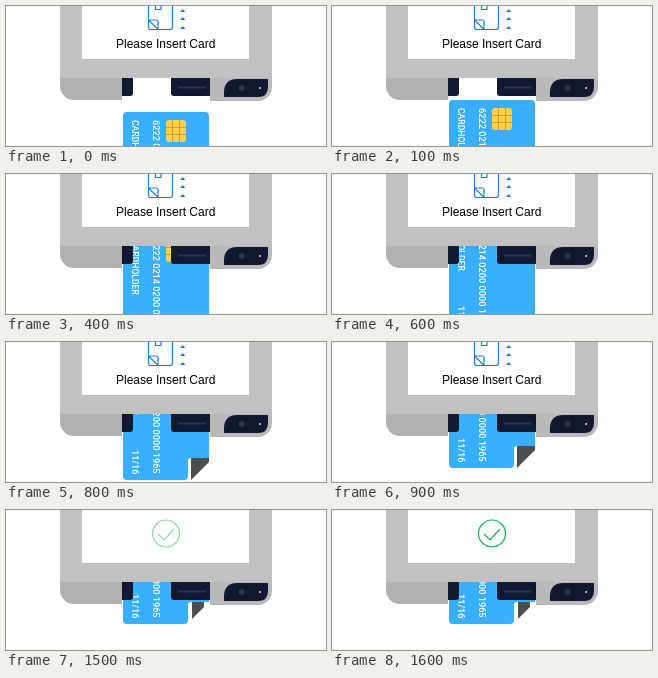
An HTML page for the animation above (2000 ms loop, 320 by 140 pixels).

```html
<!DOCTYPE html>
<html lang="en">
<head>
<meta charset="utf-8">
<title>Insert card</title>
<style>
html, body { margin: 0; width: 100%; height: 100%; overflow: hidden; background: #fff; }
svg { display: block; width: 320px; height: 140px; }
.prompt { font: 12px "Liberation Sans", Arial, sans-serif; }
.print { font: 500 9.2px Roboto, sans-serif; fill: #fff; }
.name { font-size: 8.6px; }

.card { animation: insert 2s infinite; }
.ask { animation: ask 2s step-end infinite; }
.done { opacity: 0; animation: done 2s step-end infinite; }
.wide { animation: wide 2s step-end infinite; }

@keyframes insert {
  0% { transform: translateY(0); animation-timing-function: steps(10, end); }
  50%, 100% { transform: translateY(-120px); }
}
@keyframes ask { 0% { opacity: 1; } 75%, 100% { opacity: 0; } }
@keyframes done { 0% { opacity: 0; } 75% { opacity: .5; } 80%, 100% { opacity: 1; } }
@keyframes wide { 0% { opacity: 1; } 50%, 100% { opacity: 0; } }
</style>
</head>
<body>
<svg viewBox="0 0 320 140">
  <g class="card">
    <path fill="#38b0ff" d="M121 106H199a4 4 0 0 1 4 4V212H185q-3 0-3 3V230a4 4 0 0 1-4 4H121a4 4 0 0 1-4-4V110a4 4 0 0 1 4-4Z"/>
    <path fill="#4d4d4d" d="M186 212H198V217L186 229Z"/>
    <path class="wide" fill="#4d4d4d" d="M185 212H203V216L185 234Z"/>
    <rect x="160" y="114" width="20" height="22" rx="3" fill="#ffd04a"/>
    <path fill="none" stroke="#d99a2b" d="M160 121.5H180M160 128.5H180M166.5 114V136M173.5 114V136"/>
    <g class="print">
      <text class="name" transform="translate(125.5 114) rotate(90)">CARDHOLDER</text>
      <text transform="translate(147.3 114) rotate(90)">6222 0214 0200 0000 1965</text>
      <text transform="translate(125.5 204) rotate(90)">11/16</text>
    </g>
  </g>

  <g fill="#10192f">
    <path d="M116 72H127V87a3 3 0 0 1-3 3H116Z"/>
    <path d="M165 72H204V90H168a3 3 0 0 1-3-3Z"/>
  </g>
  <path stroke="#2c3650" stroke-width="2" d="M172 81.5H200"/>

  <path fill="#b1b1b1" d="M54 72H116V94H68a14 14 0 0 1-14-14Z"/>
  <path fill="#b9b9b9" d="M204 72H266V81a14 14 0 0 1-14 14H204Z"/>
  <path fill="#10192f" d="M218 91V85Q219 73 231 73H262V81Q262 91 252 91Z"/>
  <circle cx="235.5" cy="82" r="3" fill="#2f3846"/>
  <circle cx="254" cy="82" r="1" fill="#dfe5ee"/>

  <path fill="#c1c1c1" d="M54 0H266V72H54Z"/>
  <path fill="#fff" d="M76 0H243V53H76Z"/>

  <g class="ask">
    <g fill="none" stroke="#1e7ae8" stroke-width="1.2">
      <path d="M166.5 0V21q0 2.5-2.5 2.5H152L142.5 14V0M142.5 14V21q0 2.5 2.5 2.5H152V16q0-2-2-2Z"/>
      <path d="M149.5 0V3.5H155V0"/>
    </g>
    <path fill="#1e7ae8" d="M174 6l2.7-3 2.7 3ZM174 14l2.7-3 2.7 3ZM174 23l2.7-3 2.7 3Z"/>
    <text class="prompt" x="110" y="42">Please Insert Card</text>
  </g>
  <g class="done" fill="none" stroke="#17b04e" stroke-width="1.2">
    <circle cx="160" cy="23.5" r="13.5"/>
    <path d="M152 24l6 6 10-11"/>
  </g>
</svg>
</body>
</html>
```
